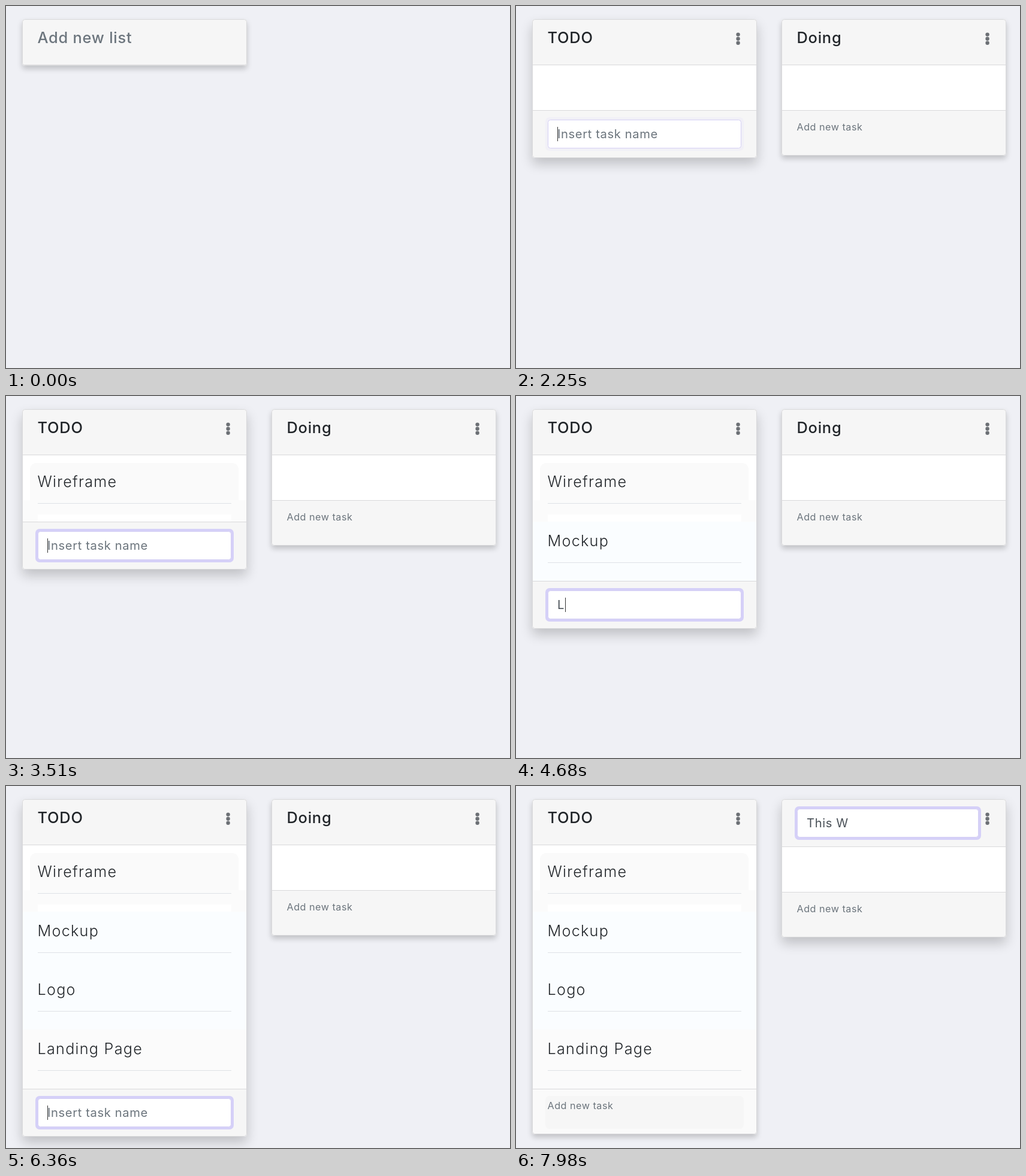
These frames come from a looping animation (841x605 px, 8 s). An HTML page with a canvas:

```html
<!DOCTYPE html>
<html lang="en">
<head>
<meta charset="utf-8">
<title>Task board</title>
<style>
  html, body { margin: 0; width: 100%; height: 100%; overflow: hidden; background: #eff0f5; }
  canvas { display: block; }
</style>
</head>
<body>
<canvas width="841" height="605"></canvas>
<script>
const ctx = document.querySelector('canvas').getContext('2d');
const LOOP = 8000, CARD_W = 375, TOP = 22;
const GREY = '#6c757d', INK = '#212529', LINE = '#d9d9db', PANEL = '#f6f6f6';

// Each task: text, first key, last key, moment it joins the list
const TASKS = [
  ['Wireframe', 2640, 3180, 3450],
  ['Mockup', 3720, 4080, 4260],
  ['Logo', 4680, 5010, 5250],
  ['Landing Page', 5460, 6120, 6270],
];
// Spans in which the caret is blinked off
const CARET_OFF = [[1320, 1470], [2430, 2640], [3660, 3720], [4470, 4680], [6480, 6690], [7980, 8000]];

const ramp = (t, start, length) => {
  const p = Math.min(1, Math.max(0, (t - start) / length));
  return p * p * (3 - 2 * p);
};

function typed(t, text, first, last) {
  if (t < first) return '';
  return text.slice(0, Math.floor((t - first) / (last - first) * (text.length - 1) + 1.01));
}

function text(str, x, y, size, color, weight = 400) {
  ctx.font = `${weight} ${size}px Inter, sans-serif`;
  ctx.letterSpacing = size * (weight === 300 ? 0.05 : 0.03) + 'px';
  ctx.fillStyle = color;
  ctx.fillText(str, x, y);
}

function rect(x, y, w, h, color) {
  ctx.fillStyle = color;
  ctx.fillRect(x, y, w, h);
}

function rounded(x, y, w, h, r, fill, stroke) {
  ctx.beginPath();
  ctx.roundRect(x, y, w, h, r);
  if (fill) { ctx.fillStyle = fill; ctx.fill(); }
  if (stroke) { ctx.strokeStyle = stroke; ctx.stroke(); }
}

function input({ value, hint = '', ring, caret }, y, w) {
  if (ring > 0) rounded(22, y - 4, w + 8, 56, 7, `rgba(213,208,248,${ring})`);
  rounded(26.5, y + .5, w - 1, 47, 4, '#fff', ring > 0 ? '#d5d0f4' : '#ced4da');
  text(value || hint, 42, y + 31, 20.2, value ? '#495057' : GREY);
  if (caret) rect(42 + (value ? Math.ceil(ctx.measureText(value).width) : 0), y + 12, 1, 24, '#333');
}

function shadow(h, hover) {
  ctx.save();
  ctx.shadowColor = 'rgba(0,0,0,.2)';
  ctx.shadowOffsetY = 5 + 5 * hover;
  ctx.shadowBlur = 10 + 10 * hover;
  rounded(0, TOP, CARD_W, h, 4, PANEL);
  ctx.restore();
}

function dots() {
  for (let i = 0; i < 3; i++) rounded(340.4, 44.4 + 7.1 * i, 6.4, 6.4, 3.2, '#6c7075');
}

function tasks(list, bottom) {
  if (!list.length) return;
  rounded(13, 112, 348, 62, [10, 10, 0, 0], '#fafafa');
  rect(1, 174, 373, bottom - 174, '#fbfbfb');
  rect(26, 198, 323, 12, '#fff');
  if (list.length > 1) rect(1, 210, 373, Math.min(bottom, 407) - 210, '#fafdff');
  list.forEach((name, i) => {
    text(name, 25.5, 152 + 98.5 * i, 25.2, INK, 300);
    rect(26, Math.round(179 + 98.6 * i), 323, 1, '#dee2e6');
  });
}

function card(x, { title, titleInput, items, taskInput, hover }) {
  const isList = Boolean(items);
  const headEnd = titleInput ? 101 : 98;
  const bodyEnd = items?.length ? Math.round(111.5 + 98.5 * items.length) : headEnd + 76;
  const end = isList ? bodyEnd + (taskInput ? 79 : 75) : headEnd + 1;
  ctx.save();
  ctx.translate(x, 0);
  shadow(end + 1 - TOP, hover);
  if (isList) {
    rect(1, headEnd, 373, bodyEnd - headEnd, '#fff');
    tasks(items, bodyEnd);
    rect(1, bodyEnd, 373, 1, LINE);
    dots();
    if (taskInput) {
      input(taskInput, bodyEnd + 16, 323);
    } else {
      if (items.length) {
        rect(1, bodyEnd + 1, 373, 74, '#fafafa');
        rounded(22, bodyEnd + 12, 331, 55, 7, '#f6f6f6');
      }
      text('Add new task', 25.5, bodyEnd + 33.5, 16.2, GREY);
    }
  }
  rect(1, headEnd, 373, 1, LINE);
  if (titleInput) input(titleInput, 38, isList ? 303 : 323);
  else text(title, 25.5, 62, 25.4, isList ? INK : GREY, 500);
  rounded(.5, TOP + .5, CARD_W - 1, end - TOP, 4, null, LINE);
  ctx.restore();
}

function firstCard(t, caret) {
  const hover = t < 1950
    ? ramp(t, 240, 240) - ramp(t, 880, 120)
    : ramp(t, 1950, 280) - ramp(t, 6690, 240);
  if (t < 900) {
    const titleInput = t >= 240 &&
      { value: typed(t, 'TODO', 630, 720), hint: 'Insert list name', ring: ramp(t, 240, 120), caret };
    return { title: 'Add new list', titleInput, hover };
  }
  const items = TASKS.filter(task => t >= task[3]).map(task => task[0]);
  const next = TASKS[items.length];
  const taskInput = t >= 2250 && t < 6690 && {
    value: next ? typed(t, ...next.slice(0, 3)) : '',
    hint: 'Insert task name', ring: ramp(t, 2235, 60), caret,
  };
  return { title: 'TODO', items, taskInput, hover };
}

function secondCard(t, caret) {
  const hover = t < 6000
    ? ramp(t, 860, 130) - ramp(t, 1770, 180)
    : ramp(t, 6720, 240);
  if (t < 1770) {
    return { titleInput: { value: typed(t, 'Doing', 1470, 1650), hint: 'Insert list name', ring: 1, caret }, hover };
  }
  const left = Math.max(0, 5 - Math.max(0, Math.floor((t - 7140) / 60)));
  const value = t < 7560 ? 'Doing'.slice(0, left) : typed(t, 'This W', 7560, 7920);
  const titleInput = t >= 6960 && { value, ring: ramp(t, 6985, 100), caret };
  return { title: 'Doing', titleInput, items: [], hover };
}

function draw(t) {
  const caret = !CARET_OFF.some(([from, to]) => t >= from && t < to);
  rect(0, 0, 841, 605, '#eff0f5');
  card(27, firstCard(t, caret));
  if (t >= 900) card(443, secondCard(t, caret));
}

const start = performance.now();
function tick() {
  draw((performance.now() - start) % LOOP);
  requestAnimationFrame(tick);
}
tick();
</script>
</body>
</html>
```
